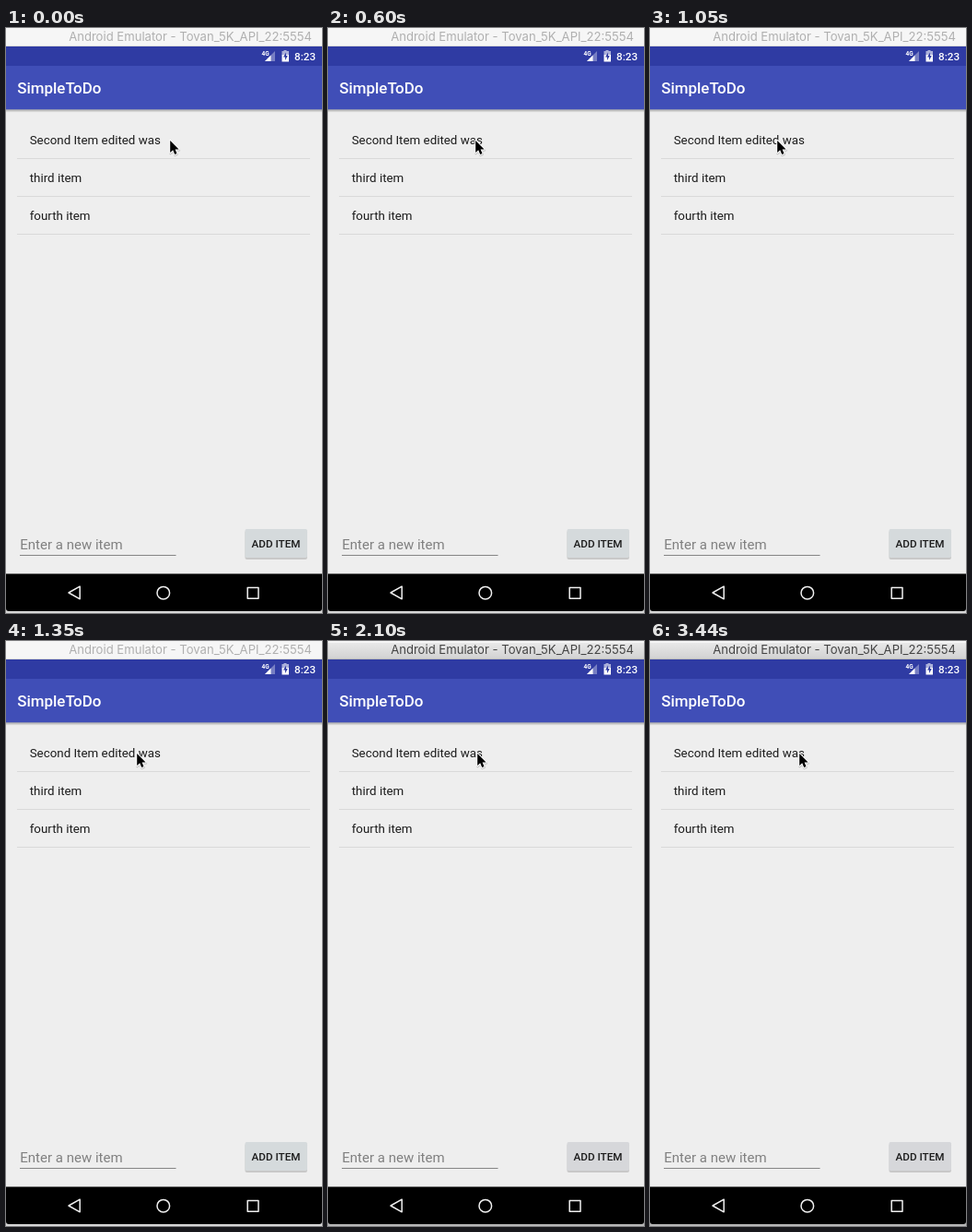
Animation, 343 px wide and 634 px high, one loop 8 s. Source, as an HTML page:

```html
<!DOCTYPE html>
<html lang="en">
<head>
<meta charset="utf-8">
<title>To-do list</title>
<style>
  html, body { margin: 0; width: 100%; height: 100%; overflow: hidden; background: #eee; }
  svg { display: block; width: 100vw; height: 100vh; font-family: Roboto, sans-serif; }
  .bar { font: 13.1px Inter, sans-serif; }
  .item { font-size: 13.35px; fill: #1c1c1c; }
  .medium { font-weight: 500; }
</style>
</head>
<body>
<svg viewBox="0 0 343 634" xmlns="http://www.w3.org/2000/svg">
  <defs>
    <linearGradient id="active" x2="0" y2="1">
      <stop stop-color="#e8e8e8"/><stop offset="1" stop-color="#d1d1d1"/>
    </linearGradient>
    <linearGradient id="shade" x2="0" y2="1">
      <stop stop-color="#000" stop-opacity=".3"/><stop offset="1" stop-color="#000" stop-opacity="0"/>
    </linearGradient>
    <path id="arrow" d="M0 0V13.200L3 10.400L5 15L7.300 14L5.400 9.600H9.400Z"/>
  </defs>
  <rect width="343" height="634" fill="#eee"/>

  <!-- window title -->
  <rect width="343" height="20" fill="#f6f6f6"/>
  <rect id="titleBar" y="2" width="343" height="18"/>
  <rect y="19" width="343" height="1" opacity=".12"/>
  <text id="title" class="bar" x="332" y="14" text-anchor="end">Android Emulator - Tovan_5K_API_22:5554</text>

  <!-- status bar -->
  <rect y="20" width="343" height="21" fill="#2f3ba3"/>
  <g fill="#fff">
    <text x="277.5" y="30" font-size="6.5" font-weight="700">4G</text>
    <path d="M292 25V36H281Z" opacity=".35"/>
    <path d="M287.500 29.500V36H281Z"/>
    <path d="M301.500 25V24H304.500V25H307V29H299.500V25Z" opacity=".6"/>
    <path d="M299.500 29H307V36.500H299.500Z"/>
    <path d="M304 26.500L301 31.500H303V35L305.800 30H304Z" fill="#2f3ba3"/>
    <text x="313" y="35" font-size="11.7" class="medium">8:23</text>
  </g>

  <!-- app bar -->
  <rect y="41" width="343" height="47.300" fill="#404eb7"/>
  <rect y="88.300" width="343" height="3.400" fill="url(#shade)"/>
  <text x="12.200" y="71" font-size="16.960" class="medium" fill="#fff">SimpleToDo</text>

  <g id="list"></g>

  <!-- entry row -->
  <text x="15.300" y="565" font-size="15" fill="#808080">Enter a new item</text>
  <rect x="15" y="571" width="169.500" height="1" fill="#858585"/>
  <rect x="259.500" y="544.500" width="67.500" height="31.500" rx="2" fill="#000" opacity=".16"/>
  <rect id="button" x="259.500" y="543" width="67.500" height="31" rx="1.700"/>
  <text x="293" y="563" font-size="11.700" class="medium" text-anchor="middle" fill="#1c1c1c">ADD ITEM</text>

  <!-- navigation -->
  <rect id="edge" y="628" width="343" height="6"/>
  <path d="M0 591.500H343V629Q343 632 340 632H3Q0 632 0 629Z" fill="#000"/>
  <g fill="none" stroke="#f0f0f0" stroke-width="1.500" stroke-linejoin="round">
    <path d="M80.200 605.200V618.800L68 612Z"/>
    <circle cx="170.800" cy="612.200" r="6.800"/>
    <rect x="262.200" y="606.500" width="11.800" height="11.800"/>
  </g>

  <g id="cursor" stroke-linejoin="round">
    <use href="#arrow" x=".3" y="1" fill="none" stroke="#000" stroke-width="2.600" opacity=".15"/>
    <use href="#arrow" stroke="#fff" stroke-width="2" paint-order="stroke"/>
  </g>
</svg>
<script>
  const LOOP = 8000, FOCUS_AT = 2100;
  // [start in ms, cursor x]
  const stops = [[0, 178.2], [450, 166.2], [600, 160.2], [900, 148.2],
                 [1050, 138.2], [1350, 142.2], [1500, 167.2], [1650, 162.2]];
  const $ = id => document.getElementById(id);
  const set = (id, name, value) => $(id).setAttribute(name, value);

  $('list').innerHTML = ['Second Item edited was', 'third item', 'fourth item'].map((label, i) =>
    `<text class="item" x="25.700" y="${126 + 41 * i}">${label}</text>
     <rect x="12" y="${141 + 41 * i}" width="318" height="1" fill="#d9d9d9"/>`).join('');

  function draw(t) {
    const x = stops.filter(([start]) => start <= t).pop()[1];
    set('cursor', 'transform', `translate(${x} 121.9)`);
    const focused = t >= FOCUS_AT;
    set('titleBar', 'fill', focused ? 'url(#active)' : '#f6f6f6');
    set('title', 'fill', focused ? '#454545' : '#b0b0b0');
    set('button', 'fill', focused ? '#d6d7da' : '#d5dadc');
    set('edge', 'fill', focused ? '#b8b8b8' : '#d8d8d8');
  }

  const begin = performance.now();
  function tick() {
    draw((performance.now() - begin) % LOOP);
    requestAnimationFrame(tick);
  }
  tick();
</script>
</body>
</html>
```
